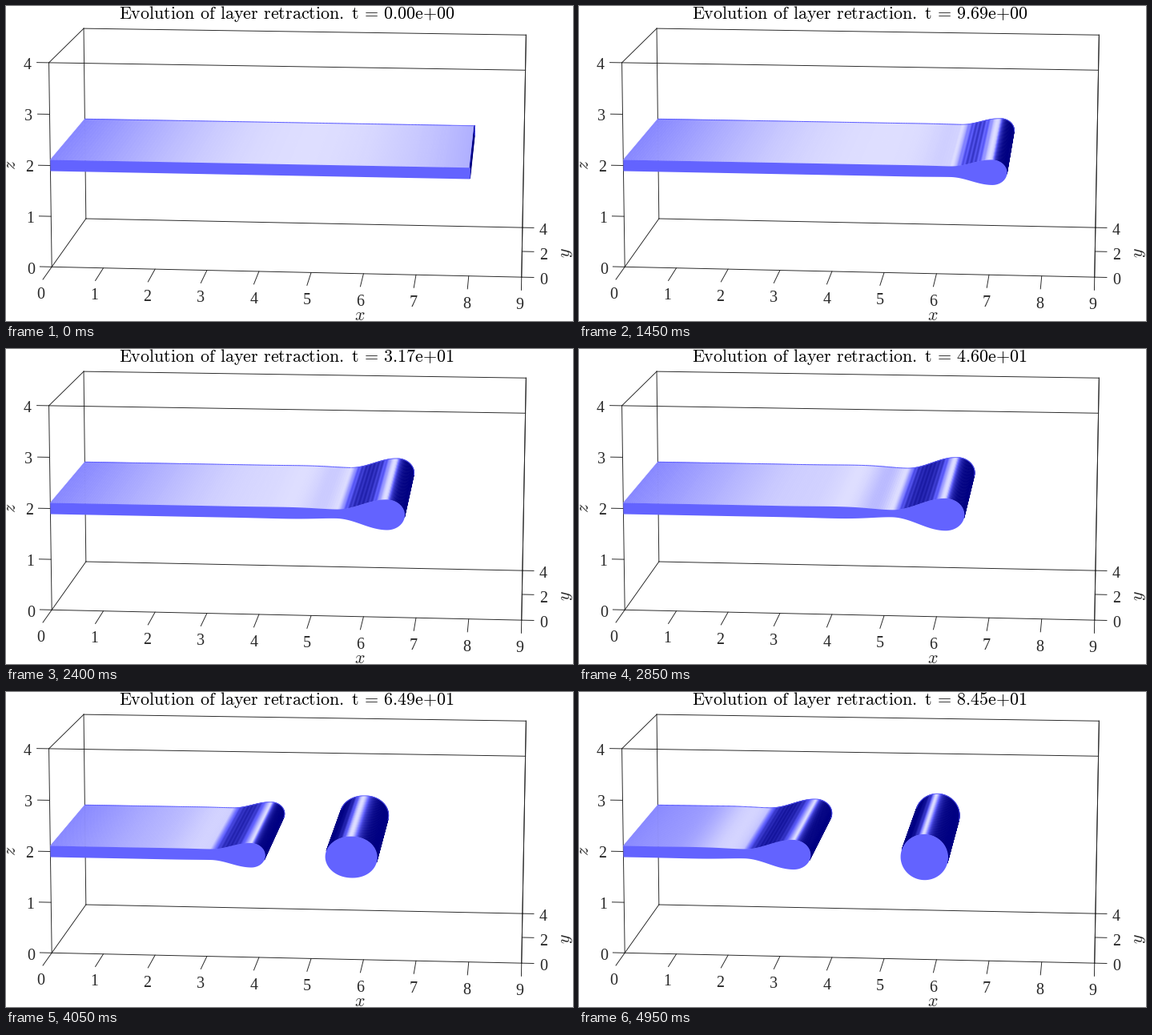
Write a matplotlib script that moves like this. It is 708 by 394 pixels and loops after 5000 ms.

```python
from itertools import combinations, product

import matplotlib.pyplot as plt
import numpy as np
from matplotlib.animation import FuncAnimation
from matplotlib.collections import LineCollection, PolyCollection
from matplotlib.patches import Rectangle

plt.rcParams["mathtext.fontset"] = "cm"
W, H, DPI = 708, 394, 64
PX = 72 / DPI  # points per pixel
FRAMES = 100
INK = "#262626"

HALF = 0.11        # half thickness of the undisturbed layer
DEPTH, MID = 4, 2  # extent in y, centre height in z
BREAK_FRAME, BREAK_TIME = 63, 56.64
DROP_AREA = 0.63

# Box corners and where they appear on screen
BOX = list(product((0, 9), (0, 4), (0, 4)))
SCREEN = [(57, 326.3), (53.8, 71), (100, 266), (96.8, 28),
          (643.8, 339.3), (648.5, 80), (644.8, 277), (649.5, 36.5)]


def fit_camera():
    rows = []
    for (x, y, z), (u, v) in zip(BOX, SCREEN):
        p, o = np.array([x, y, z, 1]), np.zeros(4)
        rows += [np.concatenate([p, o, -u * p]), np.concatenate([o, p, -v * p])]
    a = np.array(rows)
    p = np.linalg.lstsq(a[:, :11], -a[:, 11], rcond=None)[0]
    return np.append(p, 1).reshape(3, 4)


CAMERA = fit_camera()


def project(x, y, z):
    x, y, z = np.broadcast_arrays(x, y, z)
    u, v, w = CAMERA @ np.array([x, y, z, np.ones(x.shape)], float)
    return np.stack([u / w, v / w], axis=-1)


def clock(k):
    """Simulated time: step sizes grow, then restart small at the break."""
    if k == 0:
        return 0.0
    if k < BREAK_FRAME:
        g = np.log(k / 19)
        return 3.2 * np.exp(2.74 * g - 0.285 * g * g)
    return BREAK_TIME + 0.01784 * (k - 59.48) ** 2


def outline(x, h):
    """Closed loop: top edge left to right, then the underside back."""
    return (np.concatenate([x, x[-2::-1]]),
            np.concatenate([MID + h, MID - h[-2::-1]]))


def layer(length, t):
    """Sheet that was cut square at the given length a time t ago."""
    tip = length - 0.219 * np.sqrt(t)
    r = max(HALF, 0.17 * t ** 0.16)
    neck = HALF * max(1 - t / 57, 0) ** 0.27
    power = 2 + 28 * np.exp(-t / 0.005)
    crest, dip = 1.15 * r, 4.4 * r
    cap = crest * (1 - np.cos(np.linspace(0, np.pi / 2, 30)))
    s = np.concatenate([cap, np.linspace(crest, dip, 91)[1:],
                        np.linspace(dip, tip, 121)[1:]])
    bulb = r * (1 - np.clip(1 - s / crest, 0, 1) ** power) ** (1 / power)
    u = np.clip((s - crest) / (dip - crest), 0, 1)
    flank = neck + (r - neck) * (0.5 + 0.5 * np.cos(np.pi * u))
    v = np.maximum(s - dip, 0) / max(1.1 * r, 0.25)
    wave = np.exp(-0.6 * v) * (np.cos(v) + 0.6 * np.sin(v))
    tail = HALF + (neck - HALF) * wave
    h = np.where(s < crest, bulb, np.where(s < dip, flank, tail))
    return outline((tip - s)[::-1], h[::-1])


def drop(t):
    """Pinched-off end relaxing to a cylinder of constant area."""
    center = 5.755 - 0.12 * np.exp(-t / 2)
    half = 0.45 + 0.285 * np.exp(-t / 4.4)
    power = 2 + 0.8 * np.exp(-t / 4)
    skew = 0.45 * np.exp(-t / 2.5)
    w = -np.cos(np.linspace(0, np.pi, 101))
    h = np.sqrt(1 - np.abs(w) ** power) * (1 + skew * w)
    x = center + half * w
    area = np.sum((h[1:] + h[:-1]) * np.diff(x))
    return outline(x, h * DROP_AREA / area)


def shade(x, lean):
    """Glossy blue for a surface whose normal leans right by an angle."""
    ripple = 0.04 * np.sin(2 * np.pi * 12 * x)
    lean = lean + ripple * np.clip(-lean / 0.2 - 0.5, 0, 1)
    g = (lean + 0.026 * (x - 4.8)) / 0.14
    gloss = 0.55 * np.exp(-g ** 2) + 0.32 * np.exp(-g ** 2 / 6)
    return np.stack([gloss, gloss, np.minimum(1, 0.51 + 1.3 * gloss)], axis=-1)


def extrude(x, z):
    front, back = project(x, 0, z), project(x, DEPTH, z)
    along, deep = np.diff(front, axis=0), (back - front)[:-1]
    seen = along[:, 0] * deep[:, 1] - along[:, 1] * deep[:, 0] < 0
    quads = np.stack([front[:-1], front[1:], back[1:], back[:-1]], axis=1)
    lean = np.arctan2(-np.diff(z), np.diff(x))
    colors = shade((x[1:] + x[:-1]) / 2, lean)
    rim = np.stack([back[:-1], back[1:]], axis=1)
    return quads[seen], colors[seen], rim[seen], front


fig = plt.figure(figsize=(W / DPI, H / DPI), dpi=DPI, facecolor="white")
ax = fig.add_axes([0, 0, 1, 1])
ax.set_xlim(0, W)
ax.set_ylim(H, 0)
ax.axis("off")


def segment(a, b):
    p = project(*np.array([a, b], float).T)
    ax.plot(p[:, 0], p[:, 1], color=INK, lw=0.95 * PX, zorder=1)


def number(n, x, y):
    ax.text(x, y + 6.6, str(n), size=20 * PX, family="Liberation Serif",
            color=INK, ha="center", va="baseline")


def axis_name(name, x, y, **style):
    ax.text(x, y, f"${name}$", size=22 * PX, color=INK, ha="center", **style)


for a, b in combinations(BOX, 2):
    if sum(p != q for p, q in zip(a, b)) == 1:
        segment(a, b)
for n in range(10):
    segment((n, 0, 0), (n, -0.95, 0))
    number(n, 43.3 + 66.5 * n, 359 + 1.5 * n)
for n in range(5):
    segment((0, 0, n), (-0.23, 0, n))
    number(n, 31.3 - 1.2 * n, 328.3 - 64 * n)
for n in range(0, 5, 2):
    segment((9, n, 0), (9.23, n, 0))
    number(n, 671, 341.8 - 15.6 * n)
axis_name("x", 442, 393, va="baseline")
axis_name("y", 700.5, 309, rotation=90, va="center")
axis_name("z", 5.5, 199, rotation=90, va="center")

BASE = 15.8
title = ax.text(350.5, BASE, "", size=22 * PX, color="black",
                ha="center", va="baseline")
hyphen = Rectangle((525.7, BASE - 5.4), 5.8, 1.4, color="black", lw=0)
ax.add_patch(hyphen)

skin = PolyCollection([], linewidths=0.6 * PX, joinstyle="round", zorder=3)
rims = LineCollection([], colors=[(0.36, 0.36, 1)], linewidths=PX, zorder=4)
faces = PolyCollection([], facecolors=[(0.388, 0.388, 1)],
                       edgecolors="none", zorder=5)
for art in (skin, rims, faces):
    ax.add_collection(art, autolim=False)


def caption(t):
    mantissa, power = f"{t:.2e}".split("e")
    minus = power[0] == "-"
    # the hyphen is a separate bar, since math mode would set a long minus
    gap = r"\hspace{0.38}"
    sign = gap if minus else "{+}"
    words = gap.join("Evolution of layer retraction.".split())
    title.set_text(r"$\mathrm{" + words + r"\hspace{0.306}t\hspace{0.18}="
                   + r"\hspace{0.18}" + mantissa + "e" + sign + power[1:] + "}$")
    hyphen.set_visible(minus)


def draw(k):
    t = clock(k)
    caption(t)
    if k < BREAK_FRAME:
        bodies = [layer(8, t)]
    else:
        bodies = [layer(4.75, t - BREAK_TIME), drop(t - BREAK_TIME)]
    quads, colors, rim, fronts = zip(*(extrude(x, z) for x, z in bodies))
    colors = np.concatenate(colors)
    skin.set_verts(np.concatenate(quads))
    skin.set_facecolor(colors)
    skin.set_edgecolor(colors)
    rims.set_segments(np.concatenate(rim))
    faces.set_verts(fronts)
    return skin, rims, faces, title, hyphen


anim = FuncAnimation(fig, draw, frames=FRAMES, interval=50, repeat=True)
plt.show()
```
